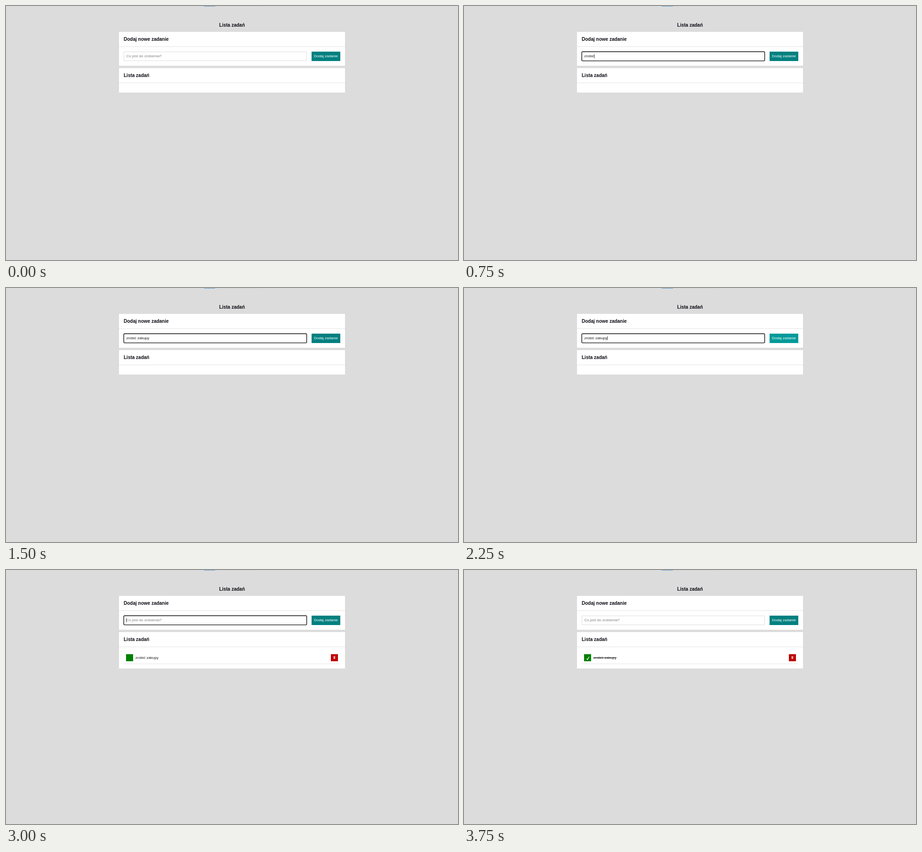
An HTML page with a canvas that plays this animation: 960 px wide and 540 px high, repeating every 4500 ms.

```html
<!DOCTYPE html>
<html lang="pl">
<head>
<meta charset="utf-8">
<title>Lista zadań</title>
<style>
html, body { margin: 0; width: 100%; height: 100%; overflow: hidden; background: #dcdcdc; }
canvas { display: block; }
</style>
</head>
<body>
<canvas id="stage" width="960" height="540"></canvas>
<script>
const ctx = document.getElementById('stage').getContext('2d');
const STEP = 750;
const TASK = 'zrobić zakupy';
const HINT = 'Co jest do zrobienia?';
const INK = '#1c1c1c';

const STATES = [
  {},
  { focus: true, typed: 'zrobić', caret: true },
  { focus: true, typed: TASK },
  { focus: true, typed: TASK, caret: true, hover: true },
  { focus: true, caret: true, listed: true },
  { listed: true, done: true }
];

function rect(x, y, w, h, color) {
  ctx.fillStyle = color;
  ctx.fillRect(x, y, w, h);
}

function text(str, x, y, color, size = 8, weight = 'normal') {
  ctx.font = `${weight} ${size}px "Liberation Sans", Arial, sans-serif`;
  ctx.fillStyle = color;
  ctx.fillText(str, x, y);
  return ctx.measureText(str).width;
}

function heading(str, x, y) {
  text(str, x, y, '#0c0c14', 10, 'bold');
}

function panel(title, y, height) {
  rect(240, y, 480, height, '#fff');
  rect(240, y + 31, 480, 1, '#e4e4e4');
  heading(title, 250, y + 19);
}

function drawInput({ focus, typed = '', caret }) {
  ctx.beginPath();
  if (focus) {
    ctx.roundRect(250.2, 97.2, 388.4, 19.4, 1.5);
    ctx.strokeStyle = '#101010';
    ctx.lineWidth = 1.4;
  } else {
    ctx.rect(250.5, 97.5, 388, 19);
    ctx.strokeStyle = '#dedede';
    ctx.lineWidth = 1;
  }
  ctx.stroke();
  const width = text(typed, 255.4, 109.4, INK);
  if (!typed) text(HINT, 255.4, 109.4, '#808080');
  if (caret) rect(255.2 + width, 102.5, 0.8, 8.5, INK);
}

function drawTask(done) {
  rect(255, 179, 15, 15, '#008000');
  const width = text(TASK, 274.8, 189, INK);
  rect(690, 179, 15, 15, '#c00000');
  rect(695.2, 183.2, 4.4, 1, '#f4d8d8');
  rect(695.6, 184.6, 3.6, 4.4, '#eab8b8');
  rect(250, 199, 460, 1, '#e4e4e4');
  if (!done) return;
  rect(274.8, 186, width, 0.8, INK);
  ctx.beginPath();
  ctx.moveTo(260.6, 188.3);
  ctx.lineTo(262.2, 190.8);
  ctx.lineTo(265.6, 184.6);
  ctx.strokeStyle = '#fff';
  ctx.lineWidth = 1.2;
  ctx.stroke();
}

function draw(state) {
  rect(0, 0, 960, 540, '#dcdcdc');
  rect(420, 0, 24, 1, '#5b9fd6');
  rect(444, 0, 96, 1, '#d6d6d6');
  heading('Lista zadań', 452.8, 44);

  panel('Dodaj nowe zadanie', 55, 72);
  drawInput(state);
  rect(649, 97, 61, 20, state.hover ? '#009a9a' : '#008080');
  text('Dodaj zadanie', 653.9, 109.4, '#fff');

  panel('Lista zadań', 132, state.listed ? 77.4 : 52);
  if (state.listed) drawTask(state.done);
}

function tick() {
  draw(STATES[Math.floor(performance.now() / STEP) % STATES.length]);
  requestAnimationFrame(tick);
}
tick();
</script>
</body>
</html>
```
